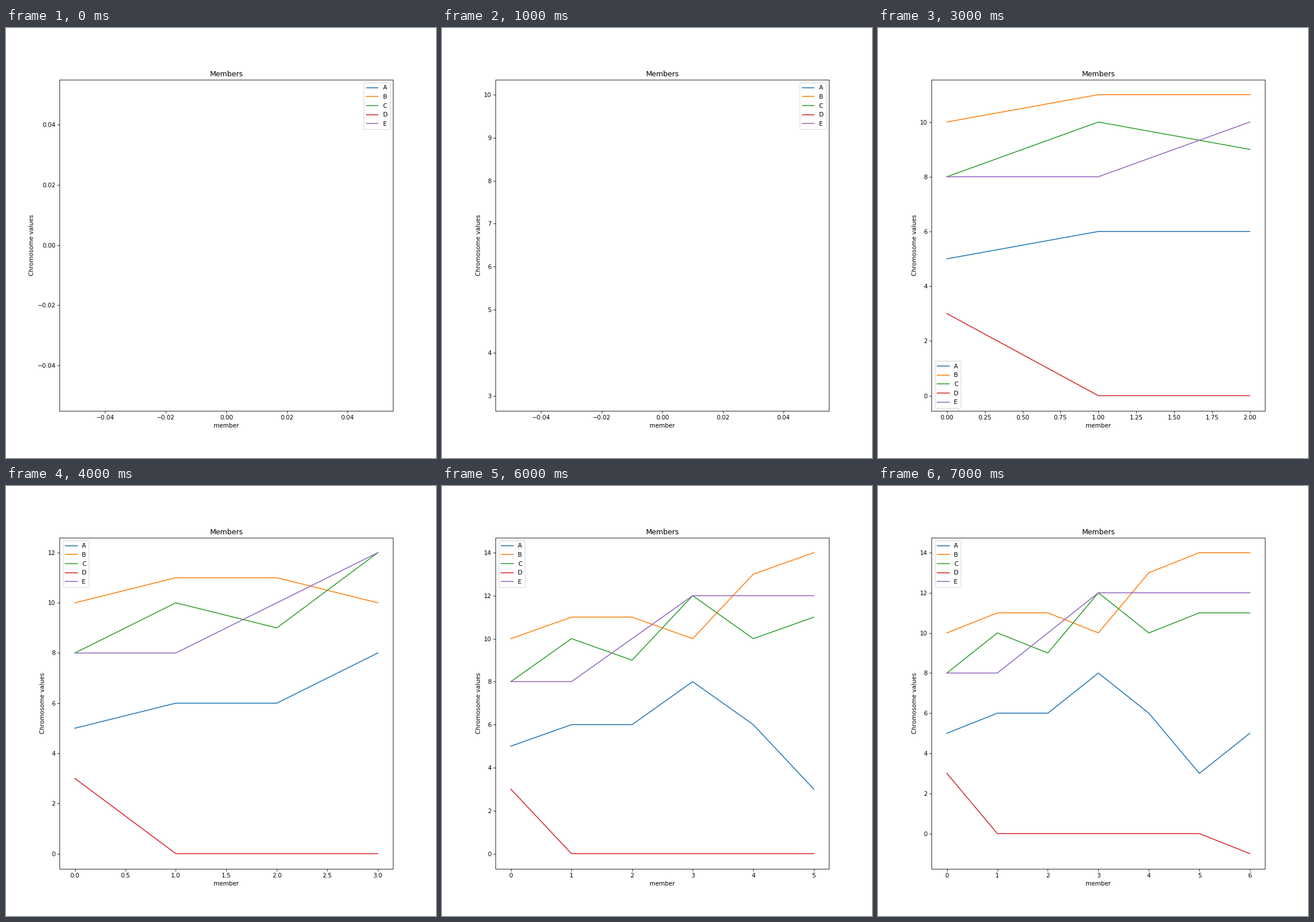
Animation, 748 px wide and 748 px high, one loop 8 s. Source, as a matplotlib script:

```python
import matplotlib.pyplot as plt
import numpy as np
from matplotlib.animation import FuncAnimation

SIZE = 748
DPI = 74.8
STEP_MS = 1000
POINTS = 7

n = np.arange(POINTS)
SERIES = {
    # slow climb to a peak, fall, then recovery
    "A": np.ceil(np.interp(n, [0, 2, 3, 5, 6], [5, 6, 8, 3, 5])),
    # steady rise with one dip
    "B": np.rint(10 + 0.72 * n) - 2 * (n == 3),
    # steady rise with a swell on every odd step
    "C": np.rint(8 + n / 2 + 2.5 * np.sin(0.6 * n) * (n % 2)),
    # drop to zero, then one step below
    "D": np.maximum(3 - 3 * n, 0) - (n > 5),
    # ramp between two plateaus
    "E": np.clip(6 + 2 * n, 8, 12),
}

plt.rcParams["font.family"] = "DejaVu Sans"
fig, ax = plt.subplots(figsize=(SIZE / DPI, SIZE / DPI), dpi=DPI)
fig.subplots_adjust(left=0.1249)


def draw(count):
    """Plot the first `count` values of every series on fresh axes."""
    ax.clear()
    for name, values in SERIES.items():
        ax.plot(n[:count], values[:count], label=name)
    ax.set_title("Members")
    ax.set_xlabel("member")
    ax.set_ylabel("Chromosome values")
    ax.legend(loc="best", labelspacing=0.54, borderpad=0.42)
    return ax.get_children()


anim = FuncAnimation(fig, draw, frames=POINTS + 1, init_func=lambda: draw(0),
                     interval=STEP_MS, repeat=True, repeat_delay=0, blit=False)

plt.show()
```
